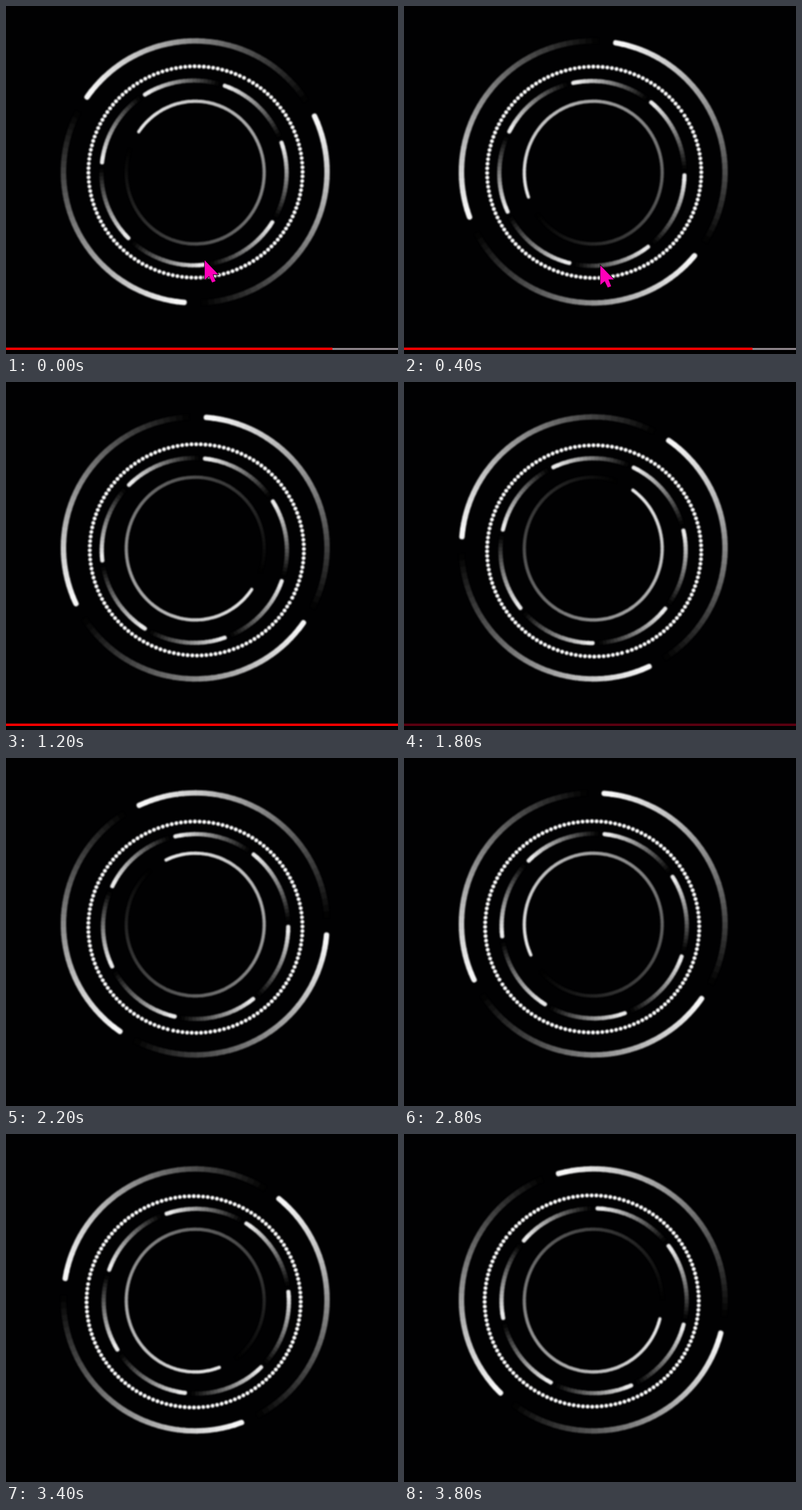
An HTML page for the animation above (4 s loop, 580 by 516 pixels).

```html
<!DOCTYPE html>
<html lang="en">
<head>
<meta charset="utf-8">
<title>Spinning rings</title>
<style>
  html, body { margin: 0; width: 100%; height: 100%; overflow: hidden; background: #010102; }
  svg { display: block; width: 580px; height: 516px; }
  #rings { filter: blur(1px); }
  path, circle { fill: none; }
</style>
</head>
<body>
<svg viewBox="0 0 580 516">
  <g id="rings">
    <g id="outer"></g>
    <circle id="dots" r="158.4" stroke="#fff" stroke-width="5.8" stroke-linecap="round"/>
    <g id="middle"></g>
    <g id="inner"></g>
  </g>
  <g id="bar">
    <rect id="track" y="507" width="580" height="3" fill="#8c8389"/>
    <rect id="played" y="506.5" height="3.5"/>
  </g>
  <path id="cursor" d="M0 0V29L6.5 23.5L11 33L16 31L12 21H20Z" style="fill:#ff00b8" stroke="#000" stroke-width="1.5" paint-order="stroke"/>
</svg>
<script>
const LOOP = 4000, STEP = 200;
const $ = id => document.getElementById(id);
const rad = deg => deg * Math.PI / 180;

// Arc cut into short strokes, brightest at its rounded start, fading clockwise.
function fadingArc(parent, { r, width, start, sweep, peak, curve, pieces }) {
  const point = deg => `${(r * Math.cos(rad(deg))).toFixed(2)} ${(r * Math.sin(rad(deg))).toFixed(2)}`;
  const size = sweep / pieces;
  const inset = width / r * 18;
  for (let i = pieces - 1; i >= 0; i--) {
    const from = start + inset + i * size;
    const level = Math.round(peak * (1 - Math.pow((i + 0.5) / pieces, curve)));
    const path = document.createElementNS('http://www.w3.org/2000/svg', 'path');
    path.setAttribute('d', `M${point(from)}A${r} ${r} 0 0 1 ${point(from + size + 0.4)}`);
    path.setAttribute('stroke', `rgb(${level},${level},${level})`);
    path.setAttribute('stroke-width', width);
    if (i === 0) path.setAttribute('stroke-linecap', 'round');
    parent.appendChild(path);
  }
}

function ring(id, count, arc) {
  for (let i = 0; i < count; i++) fadingArc($(id), { ...arc, start: i * 360 / count });
}

ring('outer', 3, { r: 195, width: 8, sweep: 112, peak: 250, curve: 1.1, pieces: 40 });
ring('middle', 7, { r: 137, width: 6.2, sweep: 47, peak: 240, curve: 1.1, pieces: 20 });
ring('inner', 1, { r: 102, width: 4.8, sweep: 344, peak: 235, curve: 1.05, pieces: 110 });

// Even round dots, with a slightly wider gap at the seam.
const DOTS = 144, SEAM = 2;
const pitch = (2 * Math.PI * 158.4 - SEAM) / DOTS;
$('dots').setAttribute('stroke-dasharray',
  `0.01 ${pitch - 0.01} `.repeat(DOTS - 1) + `0.01 ${pitch + SEAM}`);

// Piecewise linear value through [time, value] keys.
function track(keys, t) {
  let i = 1;
  while (i < keys.length - 1 && t > keys[i][0]) i++;
  const [t0, v0] = keys[i - 1], [t1, v1] = keys[i];
  return v0 + (v1 - v0) * (t - t0) / (t1 - t0);
}

const SPIN = [[0, 214.1], [800, 104.1], [1200, 34.1], [1800, -55.8],
              [2800, -206], [3400, -291.3], [3800, -346]];
const CURSOR_X = [[0, 294], [800, 287], [1000, 284]];
const CURSOR_Y = [[0, 377], [800, 392], [1000, 488]];

function place(id, x, y, turn, stretch = 1) {
  $(id).setAttribute('transform',
    `translate(${x} ${y}) scale(1 ${stretch}) rotate(${turn})`);
}

function wobble(cx, cy, size, deg) {
  return [cx + size * Math.cos(rad(deg)), cy + size * Math.sin(rad(deg))];
}

function draw(t) {
  const spin = track(SPIN, t), turned = 214.1 - spin;
  place('outer', 280, 246, spin, 0.996);
  place('inner', 280, 247, spin, 1.037);
  place('middle', ...wobble(279.8, 248.3, 1.8, 206 - 0.43 * turned), 18.9 + 1.5 * spin);
  place('dots', ...wobble(280, 248.5, 2.4, 0.5 * turned - 80), 0.5 * turned - 60, 0.989);

  $('bar').style.display = t < 2000 ? '' : 'none';
  $('track').style.display = t < 1200 ? '' : 'none';
  $('played').setAttribute('width', Math.min(580, 483 + 16.3 * t / STEP));
  $('played').setAttribute('fill', t < 1800 ? '#ff0000' : '#5c0010');

  $('cursor').style.display = t <= 1000 ? '' : 'none';
  place('cursor', track(CURSOR_X, t), track(CURSOR_Y, t), 0);
}

const began = performance.now();
function tick() {
  const t = (performance.now() - began) % LOOP;
  draw(Math.floor(t / STEP) * STEP);
  requestAnimationFrame(tick);
}
tick();
</script>
</body>
</html>
```
